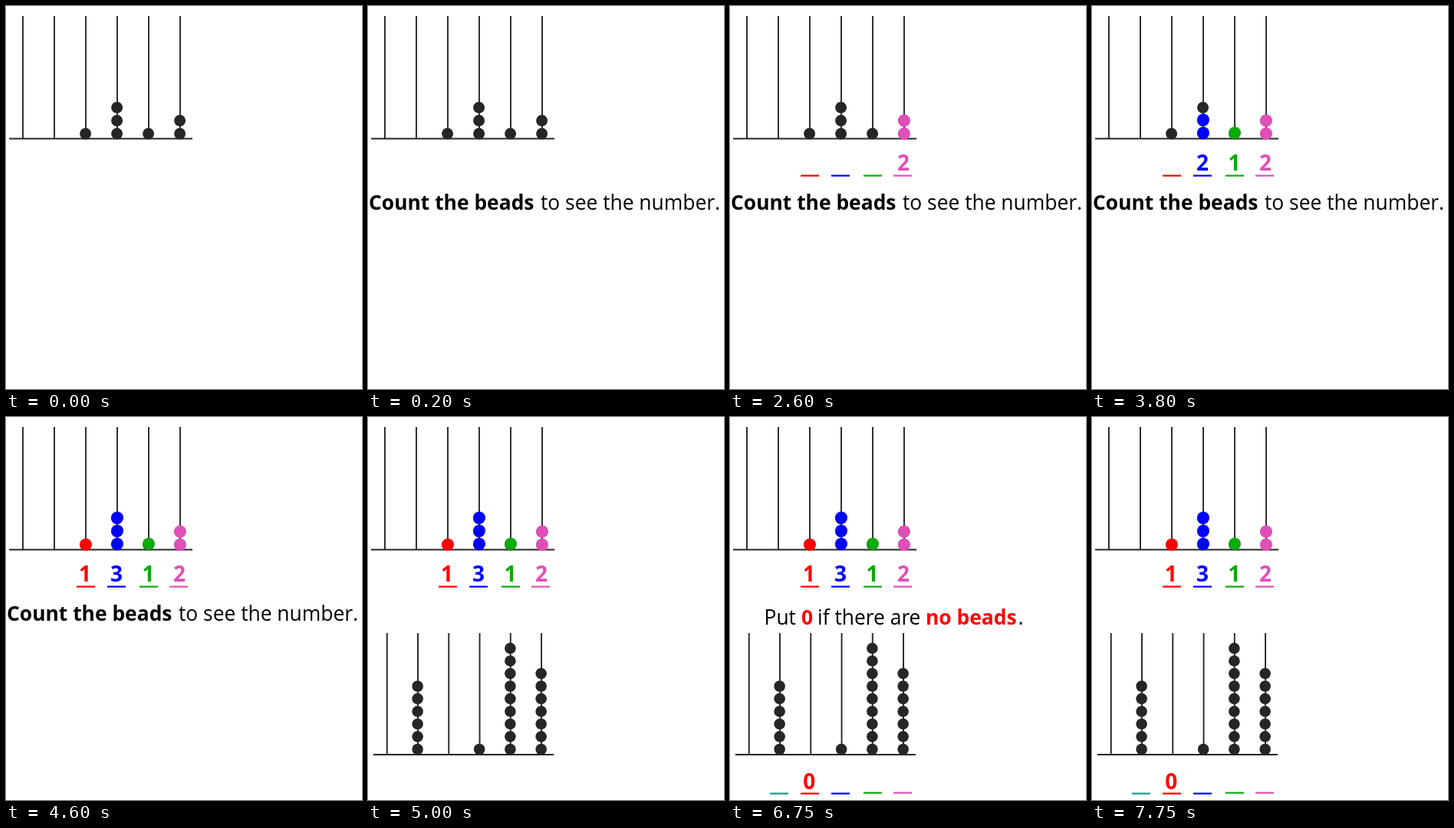
Write an HTML page that moves like this. It is 464 px wide and 498 px high and loops after 8000 ms.

```html
<!DOCTYPE html>
<html lang="en">
<head>
<meta charset="utf-8">
<title>Counting beads</title>
<style>
  html, body { margin: 0; width: 100%; height: 100%; overflow: hidden; background: #fff; }
  svg { display: block; width: 464px; height: 498px; }
  text { font: 26.4px "Open Sans", "Noto Sans", sans-serif; }
  .bold { font-weight: 700; }
  .digit { font-size: 28px; font-weight: 700; text-anchor: middle; }
</style>
</head>
<body>
<svg id="stage" viewBox="0 0 464 498"></svg>
<script>
const LOOP = 8000;
const INK = '#262626', RED = '#ff0000', BLUE = '#0000ff',
      GREEN = '#0aab0a', PINK = '#e04fb8', TEAL = '#1a9a8c';
const stage = document.getElementById('stage');
const timed = [];

// Adds an SVG element that is visible while from <= time < to.
function add(tag, attrs, from = 0, to = LOOP, label = '') {
  const node = document.createElementNS('http://www.w3.org/2000/svg', tag);
  for (const key in attrs) node.setAttribute(key, attrs[key]);
  node.textContent = label;
  stage.append(node);
  timed.push({ node, from, to });
}

const line = (x1, y1, x2, y2, width, from) =>
  add('line', { x1, y1, x2, y2, stroke: INK, 'stroke-width': width }, from);
const bead = (cx, cy, r, fill, from) => add('circle', { cx, cy, r, fill }, from);
const dash = (x, y, fill, from) => add('rect', { x, y, width: 24, height: 2.2, fill }, from);
const write = (x, y, label, from, to, cls = '', fill = '#000') =>
  add('text', { x, y, class: cls, fill }, from, to, label);

function abacus({ x, gap, top, base, left, right, firstBead, step, r, counts, from }) {
  counts.forEach((count, i) => {
    const rod = x + i * gap;
    line(rod, top, rod, base, 1.9, from);
    for (let n = 0; n < count; n++) bead(rod - 0.4, firstBead - n * step, r, INK, from);
  });
  line(left, base, right, base, 2, from);
}

abacus({ x: 22, gap: 41, top: 13, base: 172.5, left: 4, right: 243,
         firstBead: 166, step: 17, r: 7.5, counts: [0, 0, 1, 3, 1, 2], from: 0 });
abacus({ x: 24.8, gap: 40.25, top: 281, base: 439, left: 7, right: 242,
         firstBead: 432, step: 16.4, r: 7.3, counts: [0, 6, 0, 1, 9, 7], from: 5000 });

// Each column is counted bead by bead, units first.
const columns = [
  { x: 227, y: 166, mid: 226, dashX: 213, color: PINK, count: 2 },
  { x: 186, y: 165, mid: 185.5, dashX: 174, color: GREEN, count: 1 },
  { x: 145, y: 165, mid: 144, dashX: 132, color: BLUE, count: 3 },
  { x: 104, y: 166, mid: 103, dashX: 92, color: RED, count: 1 }
];
let time = 2200;
for (const { x, y, mid, dashX, color, count } of columns) {
  dash(dashX, 219.5, color, 1200);
  dash(dashX, dashX > 160 ? 487.6 : 488.5, color, 5500);
  for (let n = 1; n <= count; n++, time += 400) {
    bead(x, y - (n - 1) * 17, 8, color, time);
    write(mid, 214, n, time, n < count ? time + 400 : LOOP, 'digit', color);
  }
}
dash(52, 488.5, TEAL, 5500);
write(103.3, 484, '0', 6750, LOOP, 'digit', RED);

write(1, 265, 'Count the beads', 200, 5000, 'bold');
write(225, 265, 'to see the number.', 200, 5000);

write(44.5, 270, 'Put', 6000, 7750);
write(93, 270, '0', 6000, 7750, 'bold', RED);
write(114, 270, 'if there are', 6000, 7750);
write(255, 270, 'no beads', 6000, 7750, 'bold', RED);
write(375.5, 270, '.', 6000, 7750);

function draw(now) {
  const t = now % LOOP;
  for (const { node, from, to } of timed)
    node.setAttribute('visibility', t >= from && t < to ? 'visible' : 'hidden');
  requestAnimationFrame(draw);
}
draw(performance.now());
</script>
</body>
</html>
```
